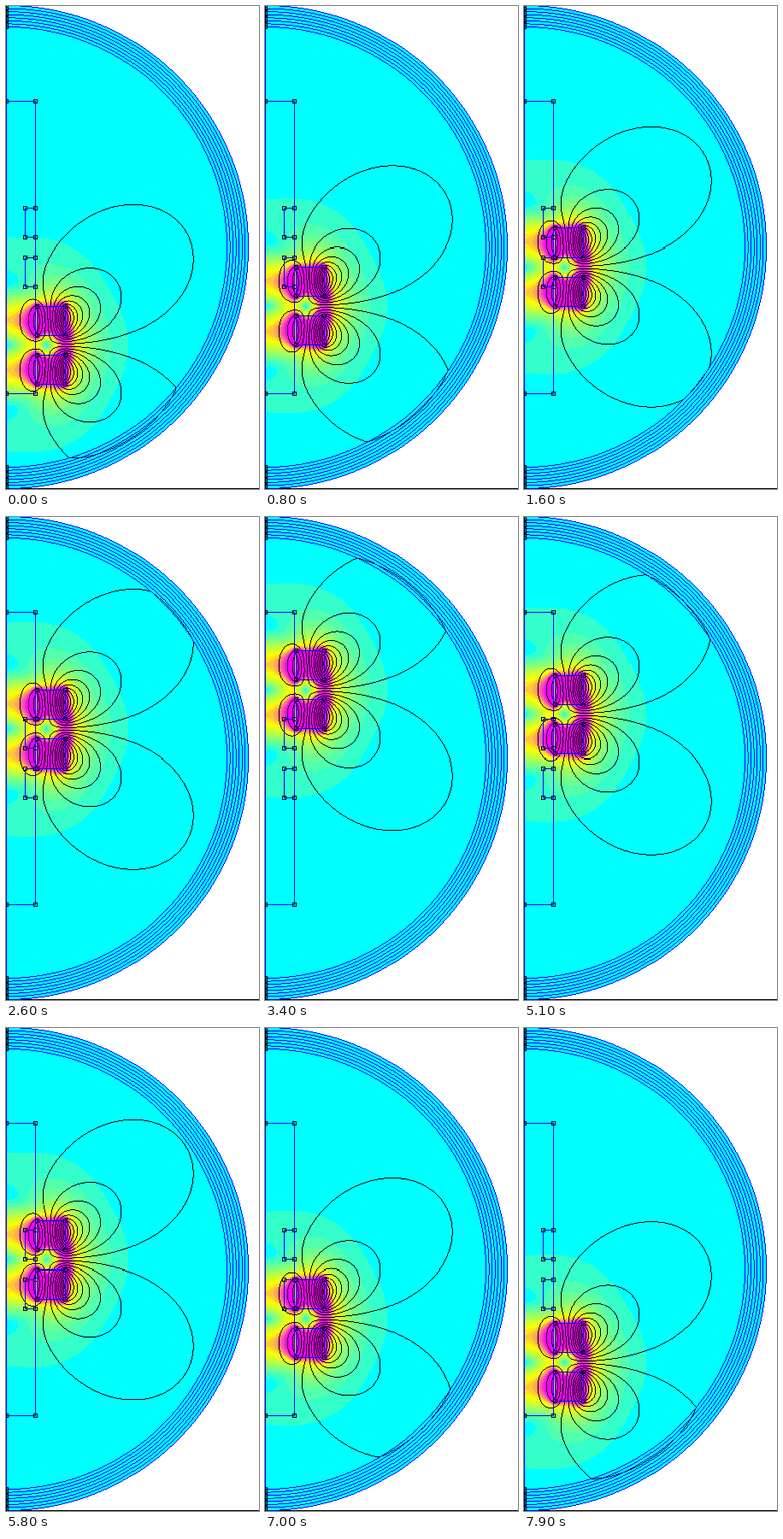
A matplotlib script for the animation above (8 s loop, 296 by 565 pixels).

```python
import numpy as np
import matplotlib.pyplot as plt
from matplotlib.animation import FuncAnimation

W, H, DPI = 296, 565, 72
FRAMES, INTERVAL = 80, 100
MID_Y, R_OUT, R_IN = 282, 282, 257
START_Y, STEP = 396.7, 5.685            # centre of the magnet pair
A_IN, A_OUT = 36, 69                    # ring magnet radii
Z_NEAR, Z_FAR = 11.5, 45.5              # magnet faces, from the pair's centre
B_STEP = 0.0172                         # flux density per colour band
BLUE, BLACK, CYAN = (0, 0, 1), (0, 0, 0), (0, 1, 1)
REACH, SPAN = 450, 500

r = np.arange(W) + 0.5
z = np.arange(-REACH, REACH) + 0.5
py, px = np.mgrid[:H, :W]
rho = np.hypot(px, py - MID_Y)


def loop_flux(a, rr, zz):
    """r * A_phi of a unit current loop, elliptic integrals by the AGM."""
    d2 = (a + rr) ** 2 + zz ** 2
    m = 4 * a * rr / d2
    x, y = np.ones_like(m), np.sqrt(1 - m)
    total, weight = m / 2, 0.5
    for _ in range(7):
        c = (x - y) / 2
        x, y = (x + y) / 2, np.sqrt(x * y)
        weight *= 2
        total = total + weight * c ** 2
    k = np.pi / (2 * x)
    e = k * (1 - total)
    return np.sqrt(d2) * ((1 - m / 2) * k - e) / (2 * np.pi)


def pair_flux():
    """Flux function of two opposed, axially magnetised rings."""
    zz, rr = np.meshgrid(np.arange(SPAN) + 0.5, r, indexing="ij")
    kernel = loop_flux(A_OUT, rr, zz) - loop_flux(A_IN, rr, zz)
    half = np.cumsum(kernel, axis=0)
    integral = np.vstack([-half[::-1], np.zeros((1, len(r))), half])

    def upto(edge):
        i = int(SPAN + z[0] - edge)
        return integral[i:i + len(z)]

    return upto(Z_NEAR) - upto(Z_FAR) - upto(-Z_FAR) + upto(-Z_NEAR)


def band_colors(n=20, yellow=0.6):
    """Cyan to yellow to magenta."""
    colors = []
    for t in np.linspace(0, 1, n):
        if t < yellow:
            s = (t / yellow) ** 0.65
            colors.append((s, 1, 1 - s))
        else:
            s = (t - yellow) / (1 - yellow)
            colors.append((1, 1 - s, s))
    return np.array(colors)


def thin_line(value, slope_x, slope_y):
    """One pixel wide trace of value == 0."""
    return np.abs(value) < np.maximum(np.abs(slope_x), np.abs(slope_y)) / 2


def box(img, x0, y0, x1, y1, color):
    img[[y0, y1], x0:x1 + 1] = color
    img[y0:y1 + 1, [x0, x1]] = color


def node(img, x, y):
    box(img, max(x - 2, 0), max(y - 2, 0), x + 2, min(y + 2, H - 1), BLACK)


def part(img, x0, y0, x1, y1):
    box(img, x0, y0, x1, y1, BLUE)
    for x in (x0, x1):
        for y in (y0, y1):
            node(img, x, y)


def at_height(table, cy):
    """Rows of a table centred on z = 0, shifted so its centre lies at cy."""
    start = REACH - cy
    i = int(np.floor(start))
    f = start - i
    return (1 - f) * table[i:i + H] + f * table[i + 1:i + 1 + H]


psi = pair_flux()
dz, dr = np.gradient(psi, 1.0, edge_order=2)
density = np.hypot(dr, dz) / r
flux = psi / (2 * psi.max() / 19)       # lines lie at the half integers
palette = band_colors()

disc = rho <= R_OUT + 0.3
depth = np.clip((rho - R_IN) / (R_OUT - R_IN), 0, 1)
shell_decay = (1 - depth) ** 1.3        # the far field is squeezed to zero
shell_radii = np.linspace(R_IN, R_OUT, 8)
safe_rho = np.maximum(rho, 1)
shells = np.any([thin_line(rho - radius, px / safe_rho, (py - MID_Y) / safe_rho)
                 for radius in shell_radii], axis=0)


def draw(cy):
    img = np.ones((H, W, 3))
    bands = np.clip(at_height(density, cy) // B_STEP, 0, 19).astype(int)
    img[disc] = np.where((rho < R_IN)[..., None], palette[bands], CYAN)[disc]

    value = at_height(flux, cy) * shell_decay
    slope_y, slope_x = np.gradient(value)
    img[thin_line(value - np.floor(value) - 0.5, slope_x, slope_y)] = BLACK

    box(img, 0, 0, W - 1, H - 1, BLACK)
    img[shells] = BLUE
    img[:, 0] = BLUE
    part(img, 0, 112, 34, 453)
    for y in (237, 294):
        part(img, 22, y, 34, y + 34)
    for face in (-Z_FAR, Z_NEAR):
        y0, y1 = int(cy + face), int(cy + face + Z_FAR - Z_NEAR)
        part(img, A_IN, y0, A_OUT, y1)
    for radius in shell_radii:
        for side in (-1, 1):
            node(img, 0, int(round(MID_Y + side * radius)))
    return img


fig = plt.figure(figsize=((W + 1e-6) / DPI, (H + 1e-6) / DPI), dpi=DPI)
ax = fig.add_axes([0, 0, 1, 1])
ax.axis("off")
stage = ax.imshow(draw(START_Y), interpolation="nearest", aspect="auto")


def update(frame):
    stage.set_data(draw(START_Y - STEP * min(frame, FRAMES - frame)))
    return [stage]


anim = FuncAnimation(fig, update, frames=FRAMES, interval=INTERVAL,
                     init_func=lambda: update(0), repeat=True, repeat_delay=0,
                     blit=False)
plt.show()
```
